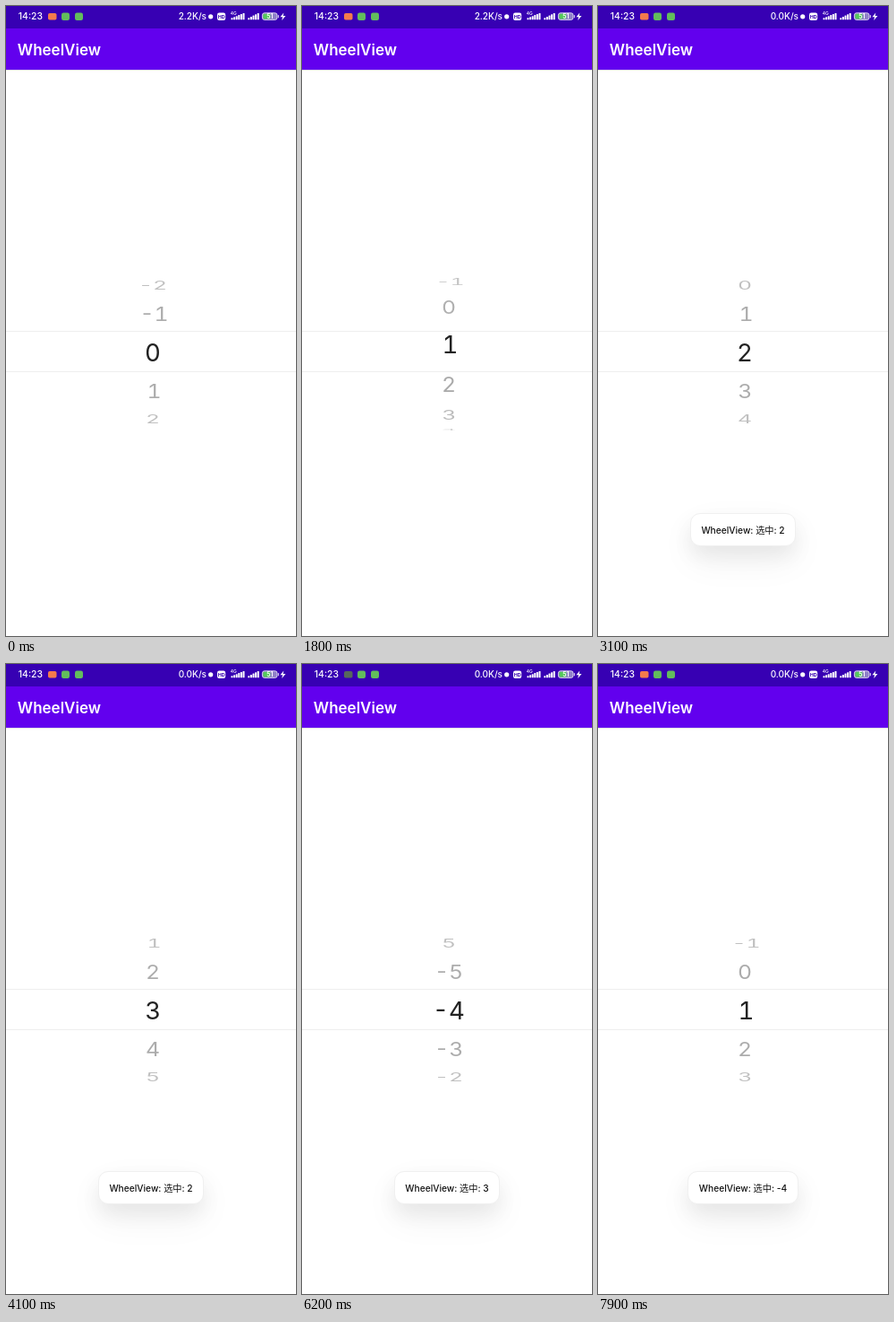
Recreate the animation shown at these times as an HTML page. Size 324 by 702 pixels, loop 8000 ms.

```html
<!DOCTYPE html>
<html lang="en">
<head>
<meta charset="utf-8">
<title>WheelView</title>
<style>
html, body { margin: 0; width: 100%; height: 100%; overflow: hidden; background: #fff; }
body { position: relative; font-family: Inter, "Noto Sans CJK SC", "Noto Sans CJK", sans-serif; }
svg { position: absolute; left: 0; top: 0; }
.layer { position: absolute; left: 0; width: 324px; overflow: hidden; }
#back { top: 72px; height: 630px; color: #a6a6a6; }
#front { top: 362px; height: 44px; background: #fff; color: #222;
  border-top: 1px solid #eee; border-bottom: 1px solid #eee; }
.layer span { position: absolute; left: 114px; width: 100px; height: 40px; line-height: 40px;
  text-align: center; font-size: 27.6px; font-feature-settings: "tnum"; white-space: nowrap; }
#toast { position: absolute; left: 0; top: 565px; width: 324px; text-align: center; }
#toast b { display: inline-block; height: 35px; line-height: 36px; padding: 0 11.5px; border-radius: 11px;
  border: .5px solid #f0f0f0; background: #fff; color: #111; font-weight: 500; font-size: 10.2px;
  white-space: nowrap; box-shadow: 0 16px 42px rgba(0,0,0,.055), 0 11px 22px rgba(0,0,0,.065); }
</style>
</head>
<body>
<div id="back" class="layer"></div>
<div id="front" class="layer"></div>
<div id="toast"><b></b></div>
<svg width="324" height="72" viewBox="0 0 324 72" fill="#fff" font-weight="500">
  <rect y="71" width="324" height="1" fill="#e2e0e6"/>
  <rect y="25" width="324" height="46" fill="#6200ee"/>
  <rect width="324" height="25" fill="#3700b3"/>
  <text x="12.8" y="54.5" font-size="17" font-weight="600">WheelView</text>
  <text x="13.8" y="15.2" font-size="10.4">14:23</text>
  <rect id="note" x="47" y="8" width="9.5" height="7.5" rx="1.8"/>
  <rect x="62" y="7.5" width="9" height="8.5" rx="2.2" fill="#62bd5c"/>
  <rect x="77" y="7.5" width="9" height="8.5" rx="2.2" fill="#62bd5c"/>
  <text id="speed" x="224" y="15.2" font-size="10" text-anchor="end"></text>
  <circle cx="228.7" cy="11.8" r="2.6"/>
  <rect x="236" y="7.5" width="9.2" height="8.4" rx="2.2"/>
  <text x="240.6" y="13.7" font-size="5.4" font-weight="700" text-anchor="middle" fill="#3700b3">HD</text>
  <text x="250.8" y="10" font-size="5">4G</text>
  <g id="bars"></g>
  <rect x="286.4" y="7.8" width="16.6" height="7.6" rx="2.4" fill="#8f80c8" stroke="#e4def5" stroke-width=".9"/>
  <rect x="287.4" y="8.7" width="8" height="5.8" rx="1.4" fill="#54c95b"/>
  <rect x="303.8" y="10" width="1" height="3.2" rx=".5" fill="#e4def5"/>
  <text x="294.8" y="14.2" font-size="7" font-weight="600" text-anchor="middle">51</text>
  <path d="M310.3 7.6L306.4 12.3H309L308.2 16L312.4 10.9H309.6Z"/>
</svg>
<script>
const LOOP = 8000, MID = 386.3, RADIUS = 86.5, STEP = Math.PI / 6, SIDE_SCALE = .9;
const $ = id => document.getElementById(id);

// start, end, from, to, ease
const inOut = u => u < .5 ? 4 * u ** 3 : 1 - 4 * (1 - u) ** 3;
const out = u => 1 - (1 - u) ** 3;
const scrolls = [
  [1400, 2150, 0, 2, inOut],
  [3100, 4000, 2, 3, inOut],
  [4200, 5360, 3, 7, out],
  [6500, 7600, 7, 12, out]
];
// start, end, value
const toasts = [[2250, 4330, 2], [4380, 6430, 3], [6480, 8530, -4]];
// age, scale, shift, opacity
const pop = [[0, .85, 8, 0], [150, 1.03, -3, 1], [350, 1, 0, 1]];

const clamp = v => Math.max(0, Math.min(1, v));
const value = i => ((i + 5) % 11 + 11) % 11 - 5;

let bars = "";
for (const [x0, n] of [[251.5, 6], [270.3, 5]])
  for (let i = 0; i < n; i++) {
    const h = 2 + i * 5.4 / (n - 1);
    bars += `<rect x="${x0 + i * 2.6}" y="${15.3 - h}" width="2" height="${h}" rx=".5"/>`;
  }
$("bars").innerHTML = bars;

const layers = [["back", 72], ["front", 363]].map(([id, top]) => {
  const items = Array.from({ length: 7 }, () => $(id).appendChild(document.createElement("span")));
  items.forEach(el => el.style.top = MID - 20 - top + "px");
  return items;
});

function position(t) {
  let p = 0;
  for (const [a, b, from, to, ease] of scrolls)
    if (t >= a) p = from + (to - from) * ease(clamp((t - a) / (b - a)));
  return p;
}

function drawWheel(p) {
  const base = Math.round(p);
  layers.forEach((items, front) => items.forEach((el, k) => {
    const i = base + k - 3, angle = (i - p) * STEP, c = Math.cos(angle);
    const shown = Math.abs(angle) < Math.PI / 2 - .01;
    el.style.display = shown ? "" : "none";
    if (!shown) return;
    const v = value(i), s = front ? 1 : SIDE_SCALE;
    el.textContent = v;
    el.style.opacity = front ? 1 : .4 + .6 * c;
    el.style.transform =
      `translate(${Math.abs(v) === 1 ? 1.5 : 0}px, ${RADIUS * Math.sin(angle)}px) scale(${s}, ${s * c})`;
  }));
}

function drawToast(t) {
  const box = $("toast"), now = toasts.find(([a, b]) => t >= a && t < b);
  box.style.display = now ? "" : "none";
  if (!now) return;
  const [a, b, v] = now, age = t - a;
  const k = age < pop[1][0] ? 0 : 1, from = pop[k], to = pop[k + 1];
  const u = clamp((age - from[0]) / (to[0] - from[0]));
  const [, s, y, o] = from.map((x, j) => x + (to[j] - x) * u);
  box.firstChild.textContent = "WheelView: 选中: " + v;
  box.style.opacity = o * clamp((b - t) / 180);
  box.style.transform = `translateY(${y}px) scale(${s})`;
}

function frame() {
  const t = performance.now() % LOOP;
  drawWheel(position(t));
  drawToast(t);
  $("speed").textContent = (t < 3000 ? "2.2" : "0.0") + "K/s";
  $("note").setAttribute("fill", t >= 5800 && t < 6600 ? "#57685c" : "#f47a4c");
  requestAnimationFrame(frame);
}
frame();
</script>
</body>
</html>
```
